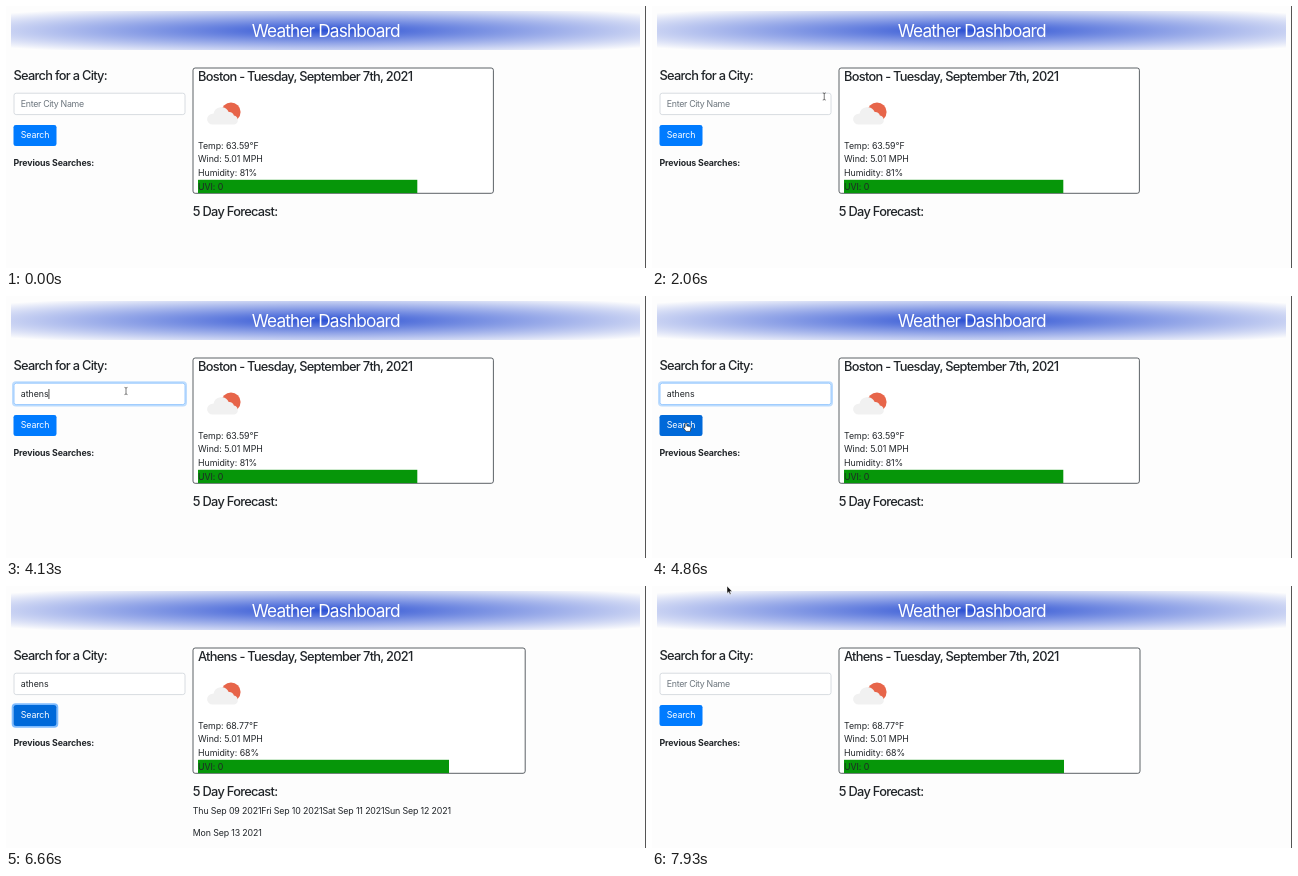
Write an HTML page that moves like this. It is 640 by 262 pixels and loops after 8000 ms.

```html
<!DOCTYPE html>
<html lang="en">
<head>
<meta charset="utf-8">
<title>Weather Dashboard</title>
<style>
html, body { margin: 0; width: 100%; height: 100%; overflow: hidden; background: #fdfdfd; }
svg { display: block; width: 640px; height: 262px; }
text { font: 400 8.8px Inter, Roboto, sans-serif; font-optical-sizing: none; letter-spacing: -.015em; fill: #212529; white-space: pre; }
.title { font-size: 17.3px; letter-spacing: -.05em; fill: #fff; }
.head { font-size: 12.8px; font-weight: 500; letter-spacing: -.055em; }
.row { letter-spacing: -.005em; }
.hint { letter-spacing: -.035em; fill: #6c757d; }
.bold { font-weight: 700; }
</style>
</head>
<body>
<svg viewBox="0 0 640 262">
  <defs>
    <radialGradient id="glow" r=".707">
      <stop offset="0" stop-color="#2c51d3"/>
      <stop offset=".95" stop-color="#fdfdfd"/>
    </radialGradient>
  </defs>
  <rect width="640" height="262" fill="#fdfdfd"/>
  <rect x="5" y="5" width="629" height="39" fill="url(#glow)"/>
  <text class="title" x="319.7" y="31.2" text-anchor="middle">Weather Dashboard</text>
  <rect x="639" width="1" height="262" fill="#555"/>

  <text class="head" x="7.5" y="74.3">Search for a City:</text>
  <rect id="fieldRing" x="6.9" y="86.1" width="173.2" height="23.6" rx="3.2" fill="none" stroke="#007bff" stroke-opacity=".25" stroke-width="1.8"/>
  <rect id="field" x="8" y="87.2" width="171" height="21.4" rx="2.2" fill="#fff" stroke-width=".8"/>
  <text id="hint" class="hint" x="14.8" y="101.2">Enter City Name</text>
  <text id="typed" class="row" x="14.8" y="101.2"></text>
  <rect id="caret" y="93" width=".8" height="10" fill="#222"/>

  <rect id="btnRing" x="6.6" y="118.1" width="44.8" height="22.8" rx="3.2" fill="none" stroke="#007bff" stroke-opacity=".5" stroke-width="1.8"/>
  <rect id="btn" x="7.5" y="119" width="43" height="21" rx="2.3"/>
  <text x="29" y="132.4" text-anchor="middle" style="fill:#fff">Search</text>
  <text class="bold" x="7.5" y="160.3">Previous Searches:</text>

  <rect id="card" x="187" y="62" height="125.3" rx="2.2" fill="#fff" stroke="#343a40" stroke-width=".8"/>
  <text id="day" class="head" x="192" y="74.5"></text>
  <circle cx="225" cy="106" r="9.6" fill="#e7654a"/>
  <path d="M206.5 118.6a5.4 5.4 0 0 1 0-10.8h1a8 8 0 0 1 15.2-1.8a5 5 0 0 1 5.2 3.6a4.6 4.6 0 0 1 .4 9z" fill="#f1f1f1"/>
  <rect id="bar" x="192" y="173.8" height="13.3" fill="#069609"/>
  <text id="temp" class="row" x="192" y="142.8"></text>
  <text class="row" x="192" y="156.4">Wind: 5.01 MPH</text>
  <text id="humid" class="row" x="192" y="170"></text>
  <text class="row" x="192" y="183.8">UVI: 0</text>

  <text class="head" x="186.8" y="210">5 Day Forecast:</text>
  <g id="forecast">
    <text x="186.8" y="227.7">Thu Sep 09 2021Fri Sep 10 2021Sat Sep 11 2021Sun Sep 12 2021</text>
    <text x="186.8" y="250.3">Mon Sep 13 2021</text>
  </g>

  <g id="pointer">
    <path id="arrow" d="M0 0v7.4l1.7-1.5 1.2 2.6 1.2-.5-1.2-2.6h2.3z" fill="#111" stroke="#fff" stroke-width=".5"/>
    <path id="beam" d="M-1.5-3.6q1.5 0 1.5 1.1q0-1.1 1.5-1.1M0-2.5v5M-1.5 3.6q1.5 0 1.5-1.1q0 1.1 1.5 1.1" fill="none" stroke="#444" stroke-width=".7"/>
    <path id="hand" d="M-.8-1.6q.8-1 1.6 0v2.6l3.6.8q.7.3.6 1.2l-.7 3.4h-4.2l-3-3.8q.5-1.2 1.8 0z" fill="#fff" stroke="#111" stroke-width=".6"/>
  </g>
</svg>
<script>
const LOOP = 8000, RATE = 15;
const ui = {};
document.querySelectorAll("[id]").forEach(el => ui[el.id] = el);

// Times below are ticks of 1/15 s.
const FOCUS = 39, CLICK = 75, LOADED = 76, FORECAST = 80, RELOAD = 117;
const KEYS = [52, 53, 54, 55, 57, 58];
const PATH = [ // tick, x, y
  [15, 497, 104], [16, 340, 92], [17, 233, 86], [21, 233, 86], [25, 212, 87],
  [26, 212, 87], [37, 120, 95], [62, 120, 95], [73, 34, 129],
  [101, 34, 129], [110, 75, 0], [120, 75, 0]
];

function place(n) {
  let i = PATH.findIndex(p => p[0] > n);
  if (i < 0) i = PATH.length - 1;
  if (i === 0) return PATH[0].slice(1);
  const [a, x, y] = PATH[i - 1], [b, u, v] = PATH[i];
  const k = (n - a) / (b - a), e = k * k * (3 - 2 * k);
  return [x + (u - x) * e, y + (v - y) * e];
}

const show = (el, on) => el.style.display = on ? "" : "none";
const inside = (x, y, l, t, r, b) => x >= l && x <= r && y >= t && y <= b;

function draw(n) {
  const [x, y] = place(n);
  const overField = inside(x, y, 8, 87, 179, 109);
  const overBtn = inside(x, y, 7, 119, 51, 140);
  show(ui.pointer, n >= 15 && (n < FORECAST || n > 101));
  ui.pointer.setAttribute("transform", `translate(${x} ${y})`);
  show(ui.beam, overField);
  show(ui.hand, overBtn);
  show(ui.arrow, !overField && !overBtn);

  const focused = n >= FOCUS && n < CLICK;
  const count = n < RELOAD ? KEYS.filter(k => k <= n).length : 0;
  ui.typed.textContent = "athens".slice(0, count);
  show(ui.hint, !count);
  show(ui.fieldRing, focused);
  ui.field.setAttribute("stroke", focused ? "#80bdff" : "#ced4da");
  const since = n - (count ? KEYS[count - 1] : FOCUS);
  show(ui.caret, focused && since < 8);
  ui.caret.setAttribute("x", 14.8 + (count ? ui.typed.getComputedTextLength() : 0));

  show(ui.btnRing, n >= CLICK && n < RELOAD);
  ui.btn.setAttribute("fill", overBtn ? "#0069d9" : "#007bff");

  const athens = n >= LOADED, wide = n >= FORECAST && n < RELOAD;
  ui.day.textContent = (athens ? "Athens" : "Boston") + " - Tuesday, September 7th, 2021";
  ui.temp.textContent = `Temp: ${athens ? "68.77" : "63.59"}°F`;
  ui.humid.textContent = `Humidity: ${athens ? 68 : 81}%`;
  ui.card.setAttribute("width", wide ? 332.2 : athens ? 301 : 300.4);
  ui.bar.setAttribute("width", wide ? 251 : athens ? 220 : 219.3);
  show(ui.forecast, wide);
}

const start = performance.now();
function tick(now) {
  const t = Math.max(0, now - start) % LOOP;
  draw(Math.floor(t * RATE / 1000 + .11));
  requestAnimationFrame(tick);
}
draw(0);
requestAnimationFrame(tick);
</script>
</body>
</html>
```
